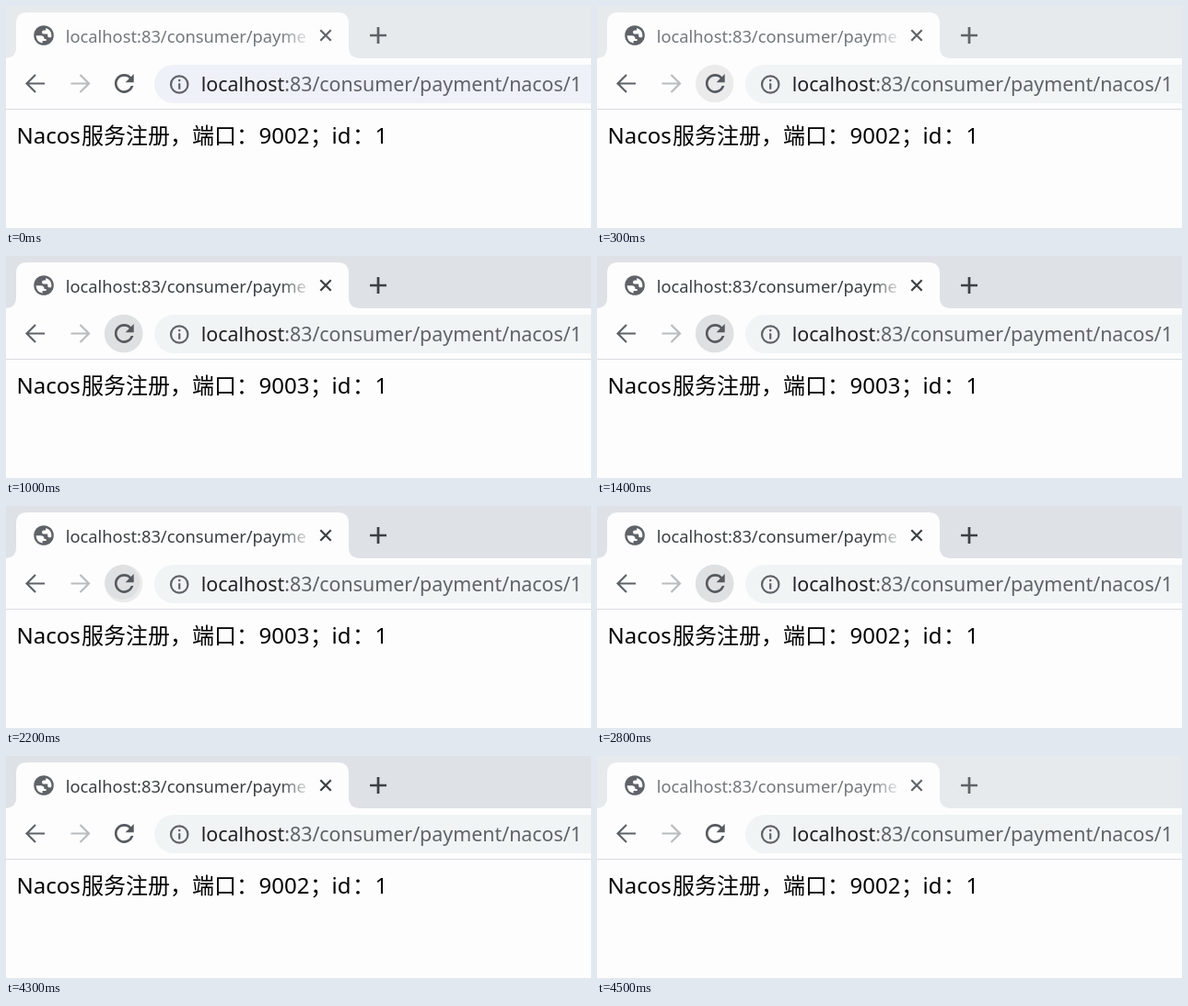
An HTML page for the animation above (4600 ms loop, 635 by 242 pixels).

```html
<!DOCTYPE html>
<html lang="zh-CN">
<head>
<meta charset="utf-8">
<title>Nacos</title>
<style>
html, body { margin: 0; width: 100%; height: 100%; overflow: hidden; background: #fdfdfd; }
svg { display: block; width: 635px; height: 242px; }
text { font-family: "Noto Sans", "Open Sans", "Noto Sans CJK SC", "Noto Sans CJK", sans-serif; white-space: pre; }
.line { fill: none; stroke-width: 2.2; }
.bold { stroke-width: 2.7; }
</style>
</head>
<body>
<svg viewBox="0 0 635 242" xmlns="http://www.w3.org/2000/svg">
  <defs>
    <linearGradient id="fade">
      <stop offset="0" stop-color="#fdfdfd" stop-opacity="0"/>
      <stop offset="1" stop-color="#fdfdfd"/>
    </linearGradient>
    <clipPath id="round"><circle cx="127.7" cy="84.5" r="20.8"/></clipPath>
  </defs>

  <rect width="635" height="242" fill="#fdfdfd"/>
  <rect id="bar" width="635" height="57"/>
  <path fill="#fdfdfd" d="M0 57Q11 56 11 46V19Q11 7 23 7H360Q372 7 372 19V46Q372 56 383 57Z"/>

  <circle cx="41" cy="32" r="12" fill="#f5f5f5" id="disc"/>
  <g id="globe">
    <circle cx="41" cy="32" r="10.8" fill="#5f6368"/>
    <path fill="#fdfdfd" d="M32.6 32.2H37.5Q41.6 32.2 41.6 36H43.6V38H39.6V40.4Q33 39.4 32.6 32.2ZM43.2 23.9Q49.4 26 49.4 32Q49.4 33 49 34.2H46.4Q45.2 34.2 45.2 32V30.6H41.2Q39 30.6 39 28.4Q39 26.4 41.2 26.4H43.2Z"/>
  </g>
  <text id="title" x="64.8" y="40" font-size="18.3">localhost:83/consumer/payme</text>
  <rect x="298" y="14" width="34" height="36" fill="url(#fade)"/>
  <path id="close" class="line" d="M341.3 26.3l11.4 11.4m0-11.4l-11.4 11.4"/>
  <path id="plus" class="line bold" d="M395 32h18m-9-9v18"/>

  <path class="line" stroke="#5f6368" d="M42 84.5H24M32 75l-9.5 9.5 9.5 9.5"/>
  <path class="line" stroke="#babcbe" d="M70.5 84.5H88.5M80.5 75l9.5 9.5-9.5 9.5"/>
  <g id="hover" clip-path="url(#round)">
    <circle cx="127.7" cy="84.5" r="20.8" fill="#ebebec"/>
    <circle id="ripple" cx="126" cy="83" fill="#dfe0e1"/>
  </g>
  <path id="reload" fill="#55595e" transform="translate(112.7 68.9) scale(1.3)" d="M17.65 6.35C16.2 4.9 14.21 4 12 4c-4.42 0-7.99 3.58-7.99 8s3.57 8 7.99 8c3.73 0 6.84-2.55 7.73-6h-2.08c-.82 2.33-3.04 4-5.65 4-3.31 0-6-2.69-6-6s2.69-6 6-6c1.66 0 3.14.69 4.22 1.78L13 11h7V4l-2.35 2.35z"/>

  <rect id="pill" x="161" y="64" width="520" height="42" rx="21"/>
  <circle class="line" cx="188.2" cy="85.5" r="9.2" stroke="#5f6368"/>
  <path fill="#5f6368" d="M187.1 80h2.2v2.2h-2.2zM187.1 84.2h2.2v6.6h-2.2z"/>
  <text x="211.8" y="93" font-size="21.4" fill="#202124">localhost<tspan fill="#5f6368">:83/consumer/payment/nacos/1</tspan></text>

  <rect y="112" width="635" height="1" fill="#dadce0"/>
  <text y="150" font-size="24" fill="#000"><tspan x="11.6">Nacos</tspan><tspan x="82">服务注册，</tspan><tspan x="202">端口：</tspan><tspan id="port" x="274.5">9002</tspan><tspan x="330">；</tspan><tspan x="353.5">id</tspan><tspan x="376">：</tspan><tspan x="400.5">1</tspan></text>
</svg>
<script>
const LOOP = 4600, STEP = 100;
const flips = [600, 800, 1000, 1200, 1400, 1600, 1800, 2000, 2200, 2400,
               2600, 2800, 2900, 3100, 3300, 3500];
const loads = [700, 1200, 2600, 2900, 3600];
const presses = [600, 1100, 1600, 2100, 2500, 3000, 3500];
const $ = id => document.getElementById(id);
const set = (id, name, value) => $(id).setAttribute(name, value);
const last = (list, t) => list.filter(x => x <= t).pop();

function draw(time) {
  const t = Math.floor(time % LOOP / STEP) * STEP;
  const active = t >= 500 && t < 4500;
  const hovered = t >= 300 && t < 4300;
  const ink = active ? "#3c4043" : "#5f6368";

  set("bar", "fill", active ? "#dee1e6" : "#e7eaed");
  set("title", "fill", active ? ink : "#74787c");
  set("close", "stroke", ink);
  set("plus", "stroke", ink);
  set("pill", "fill", t < 100 ? "#eff1f8" : "#f1f4f4");

  // favicon fades back in after each load
  const load = last(loads, t);
  const shown = load === undefined ? 1 : Math.min(1, 0.02 + (t - load) / 200);
  set("globe", "opacity", shown);
  set("disc", "opacity", 1 - shown);

  // press ripple spreads inside the hover circle
  const press = last(presses, t);
  const radius = press === undefined ? 0 : Math.min(25, 14 + (t - press) / 20);
  set("hover", "opacity", hovered ? 1 : 0);
  set("ripple", "r", radius);

  const count = flips.filter(x => x <= t).length;
  $("port").textContent = 9002 + count % 2;
}

const start = performance.now();
function tick() {
  draw(performance.now() - start);
  requestAnimationFrame(tick);
}
draw(0);
requestAnimationFrame(tick);
</script>
</body>
</html>
```
